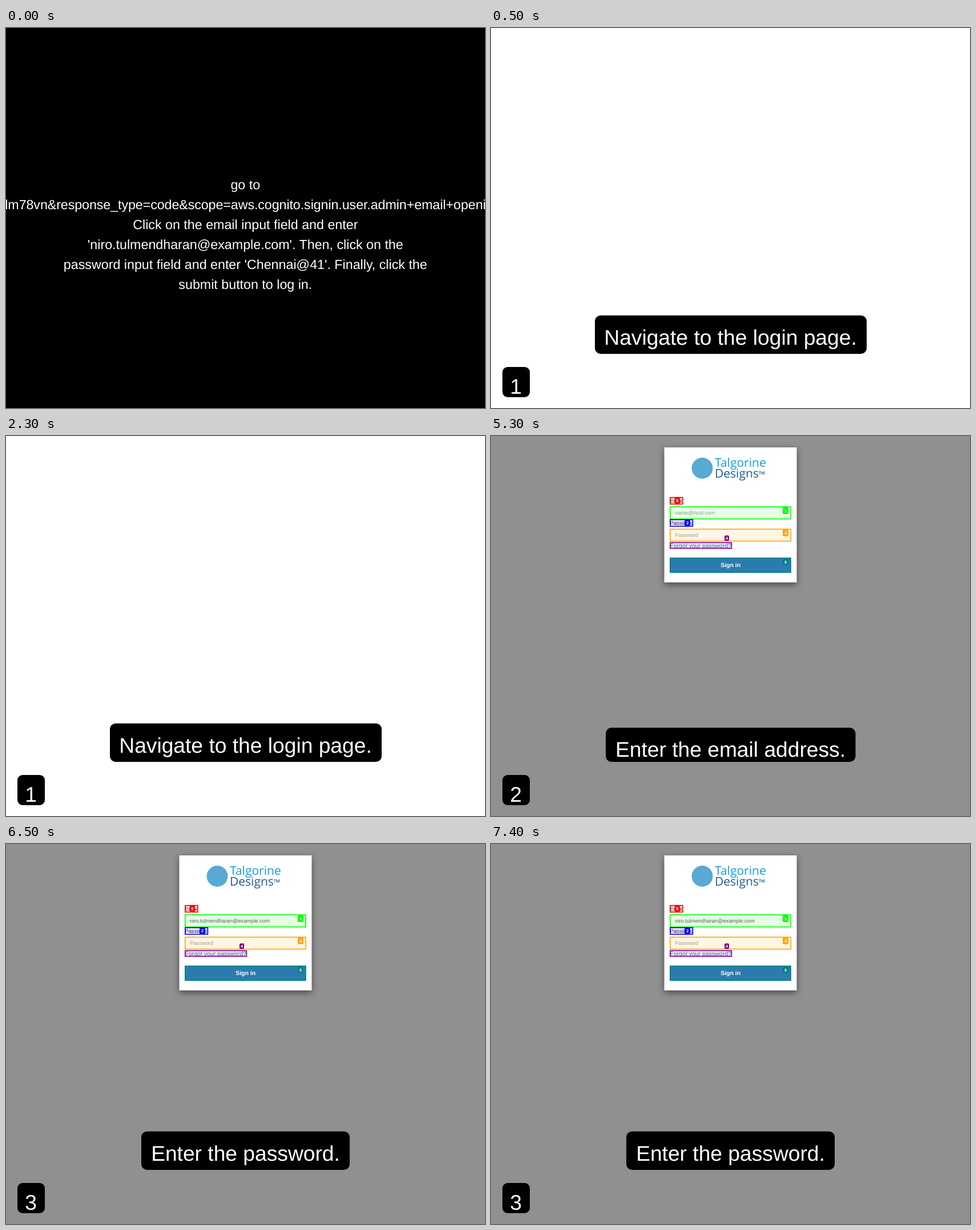
An HTML page that plays this animation: 839 by 667 pixels, repeating every 8 s.

```html
<!DOCTYPE html>
<html lang="en">
<head>
<meta charset="utf-8">
<style>
  html, body { margin: 0; width: 100%; height: 100%; overflow: hidden; background: #fff; }
  svg { display: block; width: 839px; height: 667px; }
  text { font-family: "Liberation Sans", Arial, sans-serif; text-rendering: geometricPrecision; white-space: pre; }
  .mid { text-anchor: middle; }
  .intro { font-size: 23.25px; fill: #fff; }
  .url { letter-spacing: -.08px; }
  .big { font-size: 37.2px; fill: #fff; }
  .small { font-size: 9.3px; fill: #333; }
  .brand { font: 21px "Open Sans", "Noto Sans", sans-serif; }
  .card { filter: drop-shadow(0 4px 6px rgba(0, 0, 0, .5)); }
</style>
</head>
<body>
<svg viewBox="0 0 839 667">
  <g id="intro">
    <rect width="839" height="667"/>
  </g>
  <g id="login">
    <rect width="839" height="667" fill="#909090"/>
    <rect class="card" x="303.5" y="20" width="232" height="237" fill="#fff"/>
    <circle cx="370" cy="56.5" r="18.5" fill="#58a9d3"/>
    <text class="brand" x="392" y="53.5" fill="#159be0">Talgorine</text>
    <text class="brand" x="392" y="73" fill="#1f5f8b">Designs<tspan font-size="15">™</tspan></text>
    <text class="small" x="313.5" y="117">Email</text>
    <text class="small" id="email" x="322" y="138"></text>
    <text class="small" x="313.5" y="156">Password</text>
    <text class="small" x="322" y="177" style="fill:#999">Password</text>
    <text x="313.5" y="195.5" font-size="10.5" fill="#337ab7">Forgot your password?</text>
    <rect x="314" y="214" width="211" height="25.5" fill="#2f7bb3"/>
    <g id="marks"></g>
    <text class="mid" x="419.7" y="229.8" font-size="10.5" font-weight="700" fill="#fff">Sign in</text>
  </g>
  <g id="caption">
    <rect id="box" rx="10"/>
    <text class="big mid" id="line" x="419.5"></text>
    <rect x="20" y="595" width="48" height="53" rx="9"/>
    <text class="big mid" id="step" x="43.5" y="642"></text>
  </g>
</svg>
<script>
const $ = id => document.getElementById(id);
const address = 'niro.tulmendharan@example.com';

function add(parent, tag, attrs, text = '') {
  const el = document.createElementNS('http://www.w3.org/2000/svg', tag);
  for (const key in attrs) el.setAttribute(key, attrs[key]);
  el.textContent = text;
  parent.append(el);
}

[
  'go to',
  'lm78vn&response_type=code&scope=aws.cognito.signin.user.admin+email+openi',
  'Click on the email input field and enter',
  `'${address}'. Then, click on the`,
  "password input field and enter 'Chennai@41'. Finally, click the",
  'submit button to log in.'
].forEach((text, i) => add($('intro'), 'text',
  { class: i === 1 ? 'intro mid url' : 'intro mid', x: 419.3, y: 283 + i * 34.9 }, text));

// Outlined element: color, x, y, width, height; badge: x, y, width, height
[
  ['#f00', 313.8, 107.8, 22, 11.7, 321.5, 108, 9.5, 11],
  ['#0f0', 313.8, 124.3, 211.2, 21.3, 511, 125, 10, 12],
  ['#00f', 313.8, 146.8, 39.6, 11.7, 339, 147, 10, 11.5],
  ['#ffa500', 313.8, 163.5, 211.2, 21, 511, 164, 10, 12],
  ['#800080', 313.8, 187.2, 107.6, 10, 409, 174.5, 8, 9.5],
  ['#008080', 313.8, 214.2, 211.2, 25.3, 511, 215.5, 10, 11.5]
].forEach(([color, x, y, width, height, bx, by, bw, bh], i) => {
  const marks = $('marks');
  add(marks, 'rect', { x, y, width, height, fill: color, 'fill-opacity': .1, stroke: color, 'stroke-width': 1.6 });
  add(marks, 'rect', { x: bx, y: by, width: bw, height: bh, rx: 2, fill: color });
  add(marks, 'text', { class: 'mid', x: bx + bw / 2, y: by + bh / 2 + 2.6, 'font-size': 7.4,
    'font-weight': 700, fill: '#fff' }, i);
});

// Caption box: left, top, width, text baseline
const steps = [
  ['Navigate to the login page.', 182, 504.5, 476, 555.5],
  ['Enter the email address.', 201, 512, 437.5, 562.8],
  ['Enter the password.', 237, 504.5, 365, 555.5]
];

function show(id, on) { $(id).style.display = on ? '' : 'none'; }

let current = -1;
function render(now) {
  requestAnimationFrame(render);
  const t = now % 8000;
  const scene = t < 500 ? 0 : t < 3500 ? 1 : t < 6500 ? 2 : 3;
  if (scene === current) return;
  current = scene;
  show('intro', scene === 0);
  show('login', scene > 1);
  show('caption', scene > 0);
  if (scene === 0) return;
  const [text, x, y, width, baseline] = steps[scene - 1];
  const box = { x, y, width, height: 572 - y };
  for (const key in box) $('box').setAttribute(key, box[key]);
  $('line').textContent = text;
  $('line').setAttribute('y', baseline);
  $('step').textContent = scene;
  $('email').textContent = scene === 3 ? address : 'name@host.com';
  $('email').style.fill = scene === 3 ? '#555' : '#999';
}
render(performance.now());
</script>
</body>
</html>
```
